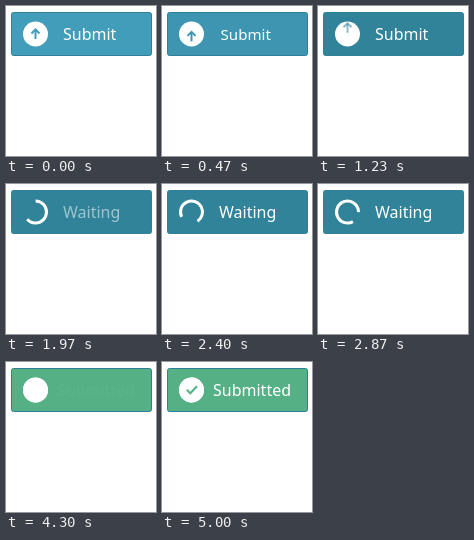
Write an HTML page with a canvas that moves like this. It is 150 px wide and 150 px high and loops after 6.01 s.

```html
<!DOCTYPE html>
<html lang="en">
<head>
<meta charset="utf-8">
<title>Submit button</title>
<style>
  html, body { margin: 0; width: 100%; height: 100%; overflow: hidden; background: #fff; }
  canvas { display: block; width: 150px; height: 150px; }
</style>
</head>
<body>
<canvas></canvas>
<script>
const LOOP = 6010;
const BLUE = [66, 157, 187], TEAL = [49, 131, 153], GREEN = [86, 176, 133];
const CX = 29.5, CY = 28;

const canvas = document.querySelector('canvas');
const ctx = canvas.getContext('2d');
const ratio = window.devicePixelRatio || 1;
canvas.width = canvas.height = 150 * ratio;

const progress = (t, from, to) => Math.min(1, Math.max(0, (t - from) / (to - from)));
const smooth = p => p * p * (3 - 2 * p);
const ease = (t, from, to) => smooth(progress(t, from, to));
const mix = (a, b, p) => a + (b - a) * p;
const blend = (a, b, p) => `rgb(${a.map((v, i) => Math.round(mix(v, b[i], p)))})`;
const radians = degrees => degrees * Math.PI / 180;

function button(color) {
  ctx.beginPath();
  ctx.roundRect(5.5, 6.5, 140, 43, 2);
  ctx.fillStyle = color;
  ctx.fill();
  ctx.lineWidth = 1;
  ctx.strokeStyle = '#2f7f98';
  ctx.stroke();
}

function label(text, x, alpha, scale = 1) {
  if (alpha <= 0) return;
  ctx.save();
  ctx.globalAlpha = alpha;
  ctx.translate(84.5, 28);
  ctx.scale(scale, scale);
  ctx.font = '16px "Noto Sans", "Open Sans", sans-serif';
  ctx.fillStyle = '#fff';
  ctx.fillText(text, x - 84.5, 6);
  ctx.restore();
}

function disc(alpha) {
  ctx.globalAlpha = alpha;
  ctx.beginPath();
  ctx.arc(CX, CY, 12.5, 0, 2 * Math.PI);
  ctx.fillStyle = '#fff';
  ctx.fill();
  ctx.globalAlpha = 1;
}

// Angles are clockwise degrees from twelve o'clock.
function ring(start, sweep) {
  ctx.beginPath();
  ctx.arc(CX, CY, 11, radians(start - 90), radians(start + sweep - 90));
  ctx.lineWidth = 3;
  ctx.strokeStyle = '#fff';
  ctx.stroke();
}

function polyline(points, color) {
  ctx.beginPath();
  points.forEach(([x, y]) => ctx.lineTo(x, y));
  ctx.lineWidth = 2;
  ctx.strokeStyle = color;
  ctx.stroke();
}

function arrow(shift, alpha, color) {
  ctx.save();
  ctx.globalAlpha = alpha;
  ctx.translate(CX, CY + shift);
  polyline([[0, 5], [0, -4]], color);
  polyline([[-4, -0.5], [0, -4.5], [4, -0.5]], color);
  ctx.restore();
}

function check(amount, color) {
  if (amount <= 0) return;
  const corner = [28.3, 31.3];
  const first = Math.min(1, amount * 3), second = Math.max(0, amount * 1.5 - 0.5);
  const points = [[24.8, 27.8], [mix(24.8, corner[0], first), mix(27.8, corner[1], first)]];
  if (second > 0) points.push([mix(corner[0], 35, second), mix(corner[1], 24.2, second)]);
  polyline(points, color);
}

function draw(t) {
  ctx.setTransform(ratio, 0, 0, ratio, 0, 0);
  ctx.fillStyle = '#fff';
  ctx.fillRect(0, 0, 150, 150);

  const color = t < 3170
    ? blend(BLUE, TEAL, ease(t, 30, 1270))
    : blend(TEAL, GREEN, ease(t, 3170, 4300));
  button(color);

  const press = ease(t, 30, 650) - ease(t, 690, 1230);
  label('Submit', 57, 1 - ease(t, 1290, 1650), 1 - 0.07 * press);
  label('Waiting', 57, progress(t, 1650, 2250) * (1 - progress(t, 3190, 4050)));
  label('Submitted', 51, ease(t, 4200, 4970));

  if (t < 1930) {
    disc(1);
    const shift = 3 * ease(t, 30, 650) - 9.5 * ease(t, 690, 1290);
    arrow(shift, 1 - 0.45 * ease(t, 900, 1230) - 0.55 * ease(t, 1250, 1600), color);
  } else {
    const spin = t - 1970;
    ring(spin * 510 / 900, Math.min(360, 228 + spin * 0.08));
    disc(ease(t, 3250, 4300));
    check(ease(t, 4430, 4900), color);
  }
}

function frame(now) {
  draw(now % LOOP);
  requestAnimationFrame(frame);
}
requestAnimationFrame(frame);
</script>
</body>
</html>
```
